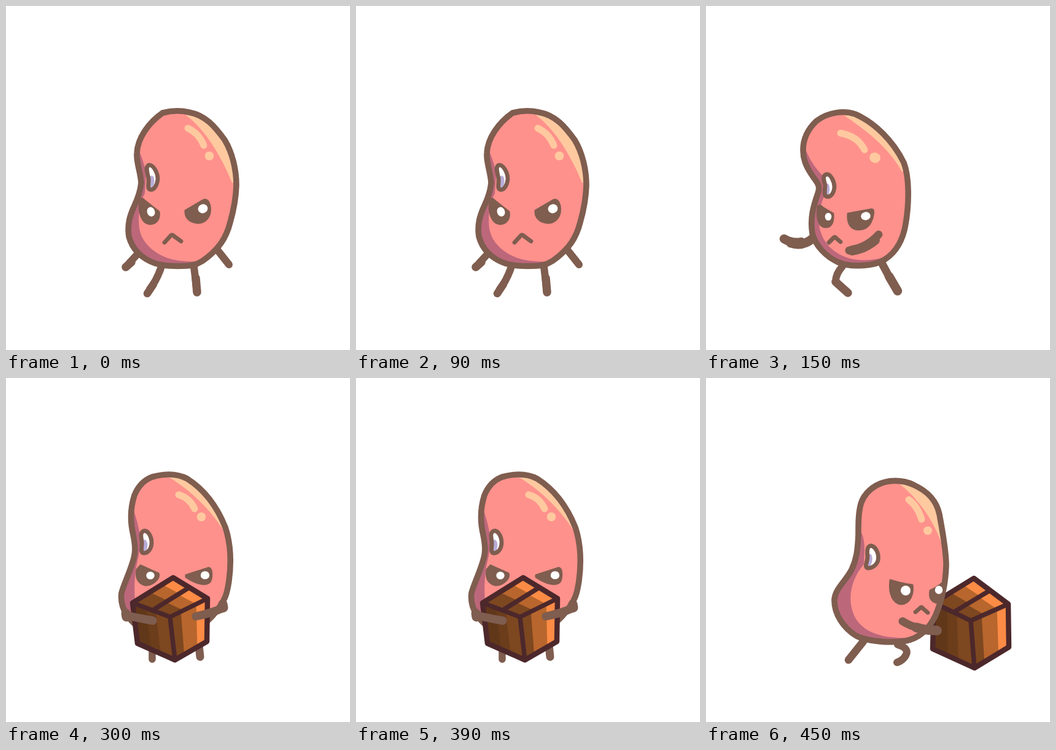
Animation, 560 px wide and 560 px high, one loop 0.6 s. Source, as an HTML page:

```html
<!DOCTYPE html>
<html lang="en">
<head>
<meta charset="utf-8">
<title>Bean carrying a box</title>
<style>
  html, body { margin: 0; width: 100%; height: 100%; overflow: hidden; background: #fff; }
  svg { display: block; width: 100vw; height: 100vh; }
</style>
</head>
<body>
<svg id="stage" viewBox="0 0 560 560"></svg>
<script>
const HOLD = 150;
const LINE = '#7f5d4f', PINK = '#ff918c', SHADE = '#bd677b', CREAM = '#ffc99f', LILAC = '#b9add8';
const EDGE = '#4c282b', DARK = '#613719', MID = '#6b3d1b', BROWN = '#7d4720', TAN = '#b8662d', BRIGHT = '#fc8b45';

const fill = (d, color) => `<path d="${d}" fill="${color}"/>`;
const line = (d, width, color = LINE) =>
  `<path d="${d}" fill="none" stroke="${color}" stroke-width="${width}" stroke-linecap="round" stroke-linejoin="round"/>`;
const oval = ([x, y, rx, ry = rx, turn = 0], color) =>
  `<ellipse cx="${x}" cy="${y}" rx="${rx}" ry="${ry}" fill="${color}" transform="rotate(${turn} ${x} ${y})"/>`;
const limbs = list => list.map(([d, w]) => line(d, w)).join('');
const poly = points => 'M' + points.map(p => p.join()).join('L') + 'Z';
const mix = (a, b, t) => [a[0] + (b[0] - a[0]) * t, a[1] + (b[1] - a[1]) * t];

// Bands start along a-b (and d-c); each one covers the rest of the quad.
const stripes = ([a, b, c, d], bands) => bands.map(([from, color]) =>
  fill(poly([mix(a, b, from), b, c, mix(d, c, from)]), color)).join('');

function drawBox({ left, back, right, front, lowLeft, lowFront, lowRight }) {
  const tapeFront = mix(left, front, .53), tapeBack = mix(back, right, .47);
  return stripes([left, front, lowFront, lowLeft], [[0, DARK], [.36, MID], [.62, BROWN]])
    + stripes([front, right, lowRight, lowFront], [[0, BROWN], [.29, TAN], [.7, BRIGHT]])
    + stripes([left, back, tapeBack, tapeFront], [[0, BROWN], [.42, TAN], [.73, BRIGHT]])
    + stripes([tapeFront, tapeBack, right, front], [[0, BROWN], [.36, TAN], [.7, BRIGHT]])
    + line(poly([left, back, right, lowRight, lowFront, lowLeft]), 8.5, EDGE)
    + line(`M${left}L${front}L${right}M${front}L${lowFront}M${tapeFront}L${tapeBack}`, 7.5, EDGE);
}

function drawPose(p, i) {
  const inside = `<clipPath id="body${i}"><path d="${p.body}"/></clipPath>`
    + `<g clip-path="url(#body${i})">${fill(p.shade, SHADE)}${fill(p.light, CREAM)}</g>`;
  const scar = `<clipPath id="scar${i}"><path d="${p.scar}"/></clipPath>` + fill(p.scar, '#fff')
    + `<g clip-path="url(#scar${i})">${oval(p.tint, LILAC)}</g>` + line(p.scar, 6.8);
  const eyes = p.eyes.map(d => fill(d, LINE) + line(d, 3)).join('')
    + p.pupils.map(o => oval(o, '#fff')).join('');
  const box = p.box ? drawBox(p.box) : '';
  return `<g visibility="hidden">${p.boxBehind ? box : ''}${limbs(p.legs)}${fill(p.body, PINK)}${inside}`
    + line(p.body, 9.6) + line(p.gloss, 11, CREAM) + oval(p.dot, CREAM) + scar + eyes
    + (p.mouth ? line(p.mouth, 6.8) : '') + (p.boxBehind ? '' : box) + limbs(p.arms) + '</g>';
}

const poses = [
  { // standing
    body: 'M255,174C270,170 285,170 298,173C325,178 340,196 356,218C368,238 375,265 375,292C374,320 369,338 365,352C358,380 345,395 328,409C315,420 305,423 295,423C275,424 255,423 243,419C220,411 205,395 200,375C197,355 202,340 209,325C216,310 219,300 220,288C219,270 212,255 213,240C214,215 232,190 255,174Z',
    shade: 'M214,228C219,243 226,256 228,275L226,305C216,325 215,345 217,362C221,385 239,401 262,410C280,416 300,417 316,415L300,435L180,430L180,290Z',
    light: 'M288,174C320,196 348,238 368,288L400,280L350,170Z',
    gloss: 'M296,199Q314,207 322,227', dot: [331, 244, 7.3],
    scar: 'M232,259C240,258 247,271 247,282C246,292 241,300 235,299C229,297 233,290 232,281C231,273 226,263 232,259Z',
    tint: [235, 289, 6, 13, 12],
    eyes: ['M218,317C219,312 223,313 226,317L249,335C251,346 245,355 234,355C222,354 215,338 218,317Z',
      'M292,333L321,316C329,312 334,325 332,337C329,349 320,354 311,353C300,352 291,345 292,333Z'],
    pupils: [[236, 335, 6.3, 7.8, -20], [320.5, 330, 8, 7.3, -20]],
    mouth: 'M258,385L268,374Q271,371 274,375L285,383',
    legs: [['M213,405L201,418', 12], ['M204,417L195,425', 13.5], ['M252,427Q245,447 234,461', 12],
      ['M240,453L230,468', 12.5], ['M306,425L311,466', 12], ['M309,443L311,466', 13.5], ['M344,397L363,421', 12]],
    arms: []
  },
  { // leaning back
    body: 'M180,187C200,172 225,170 243,176C275,190 305,220 322,255C331,278 331,320 325,355C320,385 307,402 292,412C275,424 235,426 215,417C195,408 178,390 173,370C169,345 175,325 182,305C185,297 184,292 180,286C168,270 158,255 158,235C158,215 166,200 180,187Z',
    shade: 'M160,228C168,250 178,265 193,279L196,303C184,325 182,342 185,362C191,388 210,404 234,411C254,416 275,414 298,407L290,435L160,430L145,230Z',
    light: 'M222,176C250,196 294,224 319,270L350,260L280,160Z',
    gloss: 'M219,207Q247,212 258,234', dot: [275, 247, 9, 8.3, 25],
    scar: 'M196,274C203,273 209,286 209,295C208,306 202,312 196,310C191,307 194,300 194,292C193,285 188,277 196,274Z',
    tint: [196, 301, 5, 12, 8],
    eyes: ['M182,328C182,324 187,324 190,328L207,338C208,352 204,360 195,360C184,360 180,347 182,328Z',
      'M231,338L269,331C274,330 273,338 271,345C267,358 260,364 248,364C236,363 230,354 231,338Z'],
    pupils: [[199, 343, 5.3, 6.3], [260, 342, 7.8, 6.6, -10]],
    mouth: 'M200,385L208,377Q210,375 212,378L219,384',
    legs: [['M222,424Q211,436 211,449', 12], ['M211,449L231,467', 13.5],
      ['M287,420L301,446', 13], ['M298,440L312,464', 14.5],
      ['M127,379C135,384 145,386 155,384', 14.5], ['M138,386C153,391 165,386 174,378', 15]],
    arms: [['M233,398Q261,394 281,372', 13], ['M238,398Q258,395 275,381', 16]]
  },
  { // holding the box
    body: 'M238,161C260,155 280,156 295,164C325,183 345,213 357,243C366,270 367,300 363,330C360,350 357,360 348,372C338,388 325,400 305,414L225,412C198,395 185,375 188,350C192,335 200,320 206,300C211,285 211,275 207,255C201,230 203,210 209,191C215,176 225,166 238,161Z',
    shade: 'M204,203C211,225 217,242 219,265L216,290C210,312 208,335 210,365L220,420L170,420L180,205Z',
    light: 'M257,157C294,177 330,210 354,248L385,240L310,145Z',
    gloss: 'M281,190Q299,195 307,213', dot: [318, 226, 7.3],
    scar: 'M224,249C231,247 237,258 237,268C237,279 230,286 223,285C218,282 222,275 221,266C220,258 218,252 224,249Z',
    tint: [224, 275, 6, 12, 10],
    eyes: ['M213,312L219,305L248,318Q250,322 246,328C239,336 233,338 226,337C215,334 211,325 213,312Z',
      'M293,321L330,309C336,310 336,325 332,332C325,339 309,335 293,324Z'],
    pupils: [[235, 321.5, 6.7, 6.3], [324, 321, 7.2, 6.6]],
    legs: [['M238,440L238,458', 11.5], ['M314,435L316,454', 13]],
    arms: [['M195,386Q215,391 239,395', 13.5], ['M195,383L196,389', 15],
      ['M309,388Q334,383 354,374', 13.5], ['M353,368L354,374', 15]],
    box: { left: [206, 366], back: [272, 325], right: [328, 359], front: [267, 389],
      lowLeft: [214, 432], lowFront: [275, 459], lowRight: [327, 429] }
  },
  { // pushing the box
    body: 'M277,175C295,165 320,165 338,174C360,184 375,198 380,222C385,250 391,280 391,305C390,335 383,365 373,388C362,410 345,424 325,428C300,432 265,429 245,420C225,408 208,385 209,360C211,342 228,330 237,312C245,295 247,280 248,255C248,235 248,220 252,205C256,192 265,182 277,175Z',
    shade: 'M249,244C255,254 258,263 258,278L257,303C241,322 233,345 236,368C239,393 255,410 278,417C297,423 315,424 333,422L320,445L190,440L200,300Z',
    light: 'M309,168C340,190 368,226 383,268L410,260L380,160Z',
    gloss: 'M330,198Q344,208 351,230', dot: [361, 248.5, 7],
    scar: 'M268,273C277,274 282,287 280,297C277,306 268,311 262,309C258,306 263,299 263,291C262,283 262,274 268,273Z',
    tint: [264, 299, 6, 13, 15],
    eyes: ['M300,329Q318,335 336,337C338,350 333,367 318,368C305,367 297,352 300,329Z',
      'M365,346Q375,342 387,332L388,350C385,361 380,366 376,366C367,364 363,357 365,346Z'],
    pupils: [[325, 346, 8, 8, -20], [379, 345, 6.3, 6.7]],
    mouth: 'M341,381L349,374Q351,372 353,375L361,382',
    legs: [['M256,429L232,459', 12.5], ['M312,434Q332,440 325,452Q320,460 311,463', 12]],
    arms: [['M320,396C336,406 356,411 377,412', 13], ['M342,406Q358,411 376,411', 15.5]],
    boxBehind: true,
    box: { left: [371, 366], back: [436, 326], right: [492, 368], front: [431, 395],
      lowLeft: [369, 441], lowFront: [437, 472], lowRight: [493, 438] },
    boxBehind: true
  }
];

const stage = document.getElementById('stage');
stage.innerHTML = poses.map(drawPose).join('');
const groups = [...stage.children];
const start = performance.now();

function render(time) {
  const current = Math.floor(Math.max(0, time) / HOLD) % groups.length;
  groups.forEach((g, i) => g.setAttribute('visibility', i === current ? 'visible' : 'hidden'));
}

function tick(now) {
  render(now - start);
  requestAnimationFrame(tick);
}
render(0);
requestAnimationFrame(tick);
</script>
</body>
</html>
```
